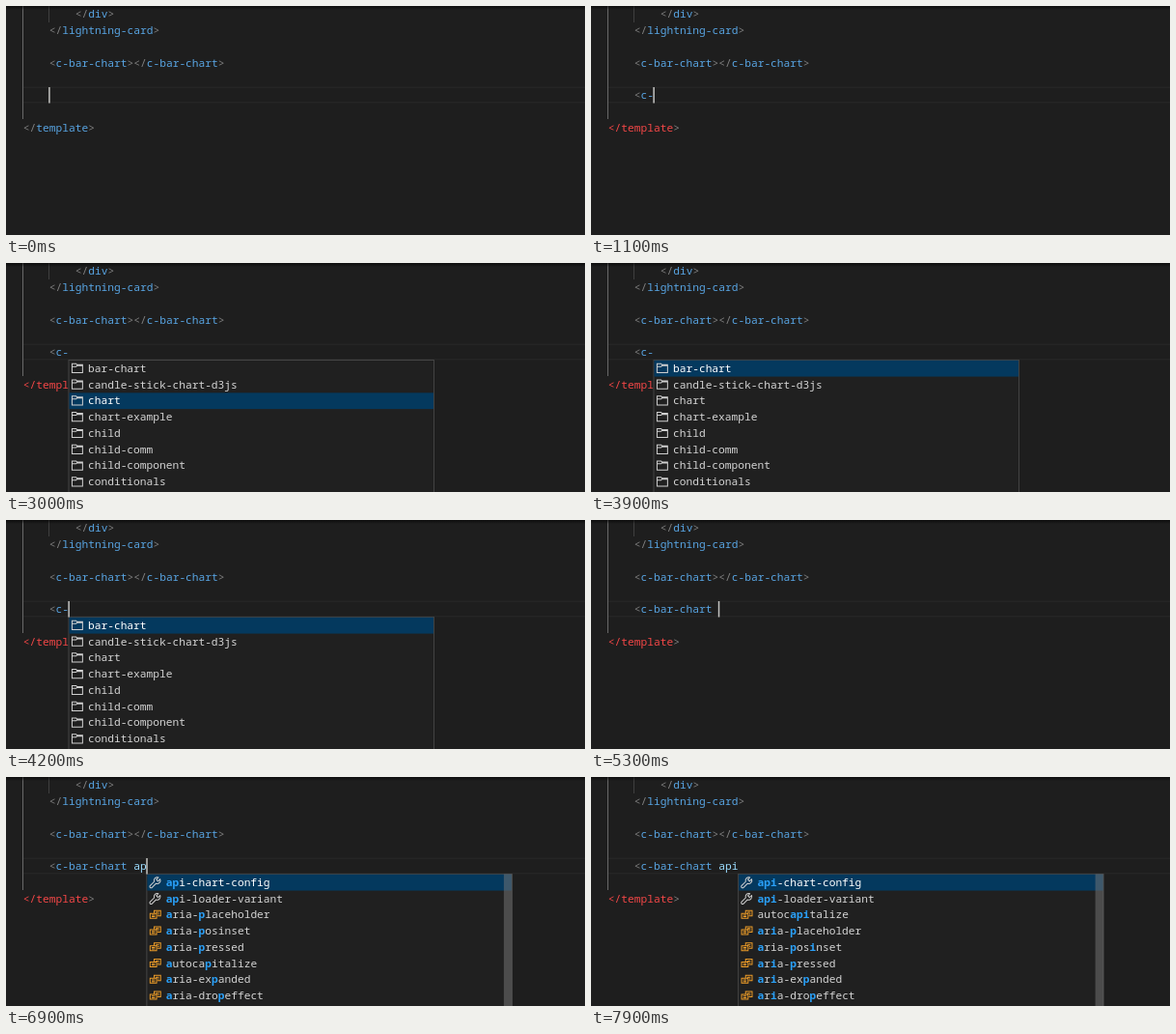
An HTML page that plays this animation: 600 px wide and 237 px high, repeating every 8 s.

```html
<!DOCTYPE html>
<html lang="en">
<head>
<meta charset="utf-8">
<title>Editor completion</title>
<style>
html, body { margin: 0; width: 100%; height: 100%; overflow: hidden; background: #1e1e1e; }
svg { display: block; width: 600px; height: 237px; }
text { font: 11.22px "Noto Sans Mono", "DejaVu Sans Mono", monospace; white-space: pre; }
.punct { fill: #808080; }
.tag { fill: #58a4e2; }
.attr { fill: #9cdcfe; }
.bad { fill: #f44747; }
.item { fill: #d4d4d4; }
.picked { fill: #fff; }
.hit { fill: #2aa0f8; font-weight: bold; }
</style>
</head>
<body>
<svg viewBox="0 0 600 237">
  <defs>
    <linearGradient id="shade" x2="0" y2="1">
      <stop stop-color="#000" stop-opacity=".6"/>
      <stop offset="1" stop-color="#000" stop-opacity="0"/>
    </linearGradient>
    <g id="folder" fill="none" stroke="#d0d0d0" stroke-width="1.2">
      <path d="M1.5 2.5h5l1 1.2h7v9.8h-13zM1.5 6h5l1-1.1h7"/>
    </g>
    <g id="wrench" fill="none" stroke="#d0d0d0" stroke-width="1.2" stroke-linejoin="round">
      <path d="M13.9 4.2l-2.6 2.6-2.1-2.1 2.6-2.6a4 4 0 0 0-5.2 5.1l-5 5a1.6 1.6 0 0 0 2.3 2.3l5-5a4 4 0 0 0 5-5.3z"/>
    </g>
    <g id="enum" fill="none" stroke="#ee9d28" stroke-width="1.2">
      <path d="M6.5 6.5V3h8v6.5h-4M1.5 6.5h8V12.5h-8zM8.5 5.2h4M11 7.3h1.5M3.5 8.5h4M3.5 10.5h4"/>
    </g>
  </defs>
  <rect width="600" height="237" fill="#1e1e1e"/>
  <path d="M18 84.2H600M18 99.8H600" stroke="#292929"/>
  <path d="M17.5 0V117" stroke="#686868"/>
  <path d="M44.5 0V17" stroke="#404040"/>
  <g id="code"></g>
  <g id="popup"></g>
  <rect id="caret" y="84" width="1.5" height="16.5" fill="#c4c4c2"/>
  <rect width="600" height="4" fill="url(#shade)"/>
</svg>
<script>
const LOOP = 8000, LEAD = 20, CHAR = 6.74, ROW = 16.77, LEFT = 17.8;
const $ = id => document.getElementById(id);
const colX = col => LEFT + col * CHAR;
const baseY = row => 12.2 + row * ROW;
const esc = s => s.replace(/</g, '&lt;').replace(/>/g, '&gt;');
const span = (cls, s) => s ? `<tspan class="${cls}">${esc(s)}</tspan>` : '';
const line = (x, row, body, cls = '') =>
  `<text x="${x}" y="${baseY(row)}" class="${cls}">${body}</text>`;

// Typed text and the moment each key lands; the first entry sets the blink phase.
const keys = [
  [100, ''], [800, '<'], [1000, '<c'], [1100, '<c-'], [4800, '<c-bar-chart'],
  [5300, '<c-bar-chart '], [6600, '<c-bar-chart a'], [6800, '<c-bar-chart ap'],
  [7400, '<c-bar-chart api']
];
const picks = [[1300, 0], [2600, 1], [2800, 2], [3500, 1], [3900, 0]];

const parts = ['bar-chart', 'candle-stick-chart-d3js', 'chart', 'chart-example',
  'child', 'child-comm', 'child-component', 'conditionals'];
// Brackets mark the matched letters.
const twoKeys = ['[ap]i-chart-config', '[ap]i-loader-variant', '[a]ria-[p]laceholder',
  '[a]ria-[p]osinset', '[a]ria-[p]ressed', '[a]utoca[p]italize',
  '[a]ria-ex[p]anded', '[a]ria-dro[p]effect'];
const threeKeys = ['[api]-chart-config', '[api]-loader-variant', 'autoc[api]talize',
  '[a]r[i]a-[p]laceholder', '[a]ria-[p]os[i]nset', '[a]r[i]a-[p]ressed',
  '[a]r[i]a-ex[p]anded', '[a]r[i]a-dro[p]effect'];

const last = (list, t) => list.reduce((hit, e) => e[0] <= t ? e : hit, list[0]);

function tagLine(col, row, s) {
  const body = s.split(/(<\/?|>)/).map(p => span(/[<>]/.test(p) ? 'punct' : 'tag', p));
  return line(colX(col), row, body.join(''));
}

function codeView(typed) {
  const [head, attr = ''] = typed.split(' ');
  const typedLine = span('punct', head.slice(0, 1)) + span('tag', head.slice(1)) +
    span('attr', attr && ' ' + attr);
  return tagLine(8, 0, '</div>') + tagLine(4, 1, '</lightning-card>') +
    tagLine(4, 3, '<c-bar-chart></c-bar-chart>') + line(colX(4), 5, typedLine) +
    (typed ? line(LEFT, 7, span('bad', '</template') + span('punct', '>'))
           : tagLine(0, 7, '</template>'));
}

function popupView(col, items, pick, icon, slider) {
  const x = colX(col), top = 100.5, width = 378.5;
  let out = `<rect x="${x}" y="${top}" width="${width}" height="150" fill="#202020" stroke="#454545"/>` +
    `<rect x="${x + .5}" y="${top + .3 + pick * ROW}" width="${width - 1}" height="${ROW}" fill="#04395e"/>`;
  items.forEach((item, i) => {
    const body = item.split(/[\[\]]/).map((p, n) => n % 2 ? span('hit', p) : esc(p)).join('');
    out += `<use href="#${icon(i)}" transform="translate(${x + 2.2} ${102.2 + i * ROW}) scale(.84)"/>` +
      line(x + 20, 6 + i, body, i === pick ? 'picked' : 'item');
  });
  if (slider)
    out += `<rect x="${x + width - 8.5}" y="${top}" width="8.5" height="150" fill="#797979" fill-opacity=".5"/>`;
  return out;
}

function popupAt(t) {
  if (t >= 1300 && t < 4800) return popupView(7, parts, last(picks, t)[1], () => 'folder');
  const icon = i => i < 2 ? 'wrench' : 'enum';
  if (t >= 7500) return popupView(20, threeKeys, 0, icon, true);
  if (t >= 6800) return popupView(19, twoKeys, 0, icon, true);
  return '';
}

const shown = {};
function put(id, html) {
  if (shown[id] !== html) $(id).innerHTML = shown[id] = html;
}

function draw(now) {
  const t = now % LOOP + LEAD;
  const [since, typed] = last(keys, t);
  put('code', codeView(typed));
  put('popup', popupAt(t));
  const off = Math.floor(Math.max(0, t - since) / 500) % 2;
  $('caret').setAttribute('x', colX(4 + typed.length) - .6);
  $('caret').setAttribute('visibility', off ? 'hidden' : 'visible');
}

const start = performance.now();
function tick() {
  draw(performance.now() - start);
  requestAnimationFrame(tick);
}
tick();
</script>
</body>
</html>
```
